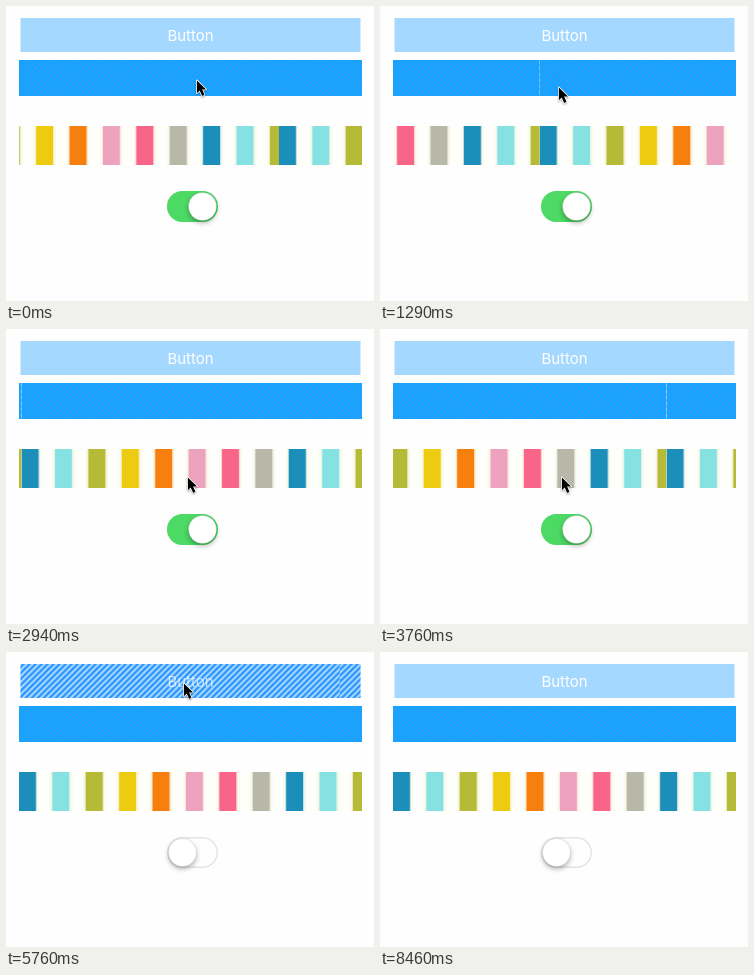
These frames come from a looping animation (368 by 295 pixels, 8.93 s). An HTML page with a canvas:

```html
<!DOCTYPE html>
<html>
<head>
<meta charset="utf-8">
<style>
html, body { margin: 0; width: 100%; height: 100%; overflow: hidden; background: #fefefe; }
canvas { display: block; }
</style>
</head>
<body>
<canvas id="stage" width="368" height="295"></canvas>
<script>
const ctx = document.getElementById('stage').getContext('2d');
const LOOP = 8930, STEP = 117.5, SPEED = 0.0876;
const STOP = 4700, PRESS = 5530, RELEASE = 7400, LEAVE = 8440;
const COLORS = ['#1b8fba', '#86e2e2', '#b5bb36', '#edcb10', '#f67f0e', '#eda3bd', '#f96588', '#b8b8a9'];

// Pointer tip: time, x, y
const PATH = [
  [0, 190, 73], [600, 186, 204], [900, 186, 204], [1290, 178, 80], [1890, 181, 147], [3760, 181, 147],
  [4700, 182, 190], [5170, 177, 30], [7280, 177, 30], [7760, 186, 176], [8110, 220, 196], [LOOP, 204, 222]
];

const clamp = v => Math.max(0, Math.min(1, v));
const ease = v => v * v * (3 - 2 * v);
const mod = (a, b) => ((a % b) + b) % b;

function pointerAt(t) {
  const i = PATH.findIndex(p => p[0] > t);
  const [t0, x0, y0] = PATH[i - 1], [t1, x1, y1] = PATH[i];
  const u = ease((t - t0) / (t1 - t0));
  return [x0 + (x1 - x0) * u, y0 + (y1 - y0) * u];
}

function rect(x, y, w, h, color) {
  ctx.fillStyle = color;
  ctx.fillRect(x, y, w, h);
}

function clipped(x, y, w, h, draw) {
  ctx.save();
  ctx.beginPath();
  ctx.rect(x, y, w, h);
  ctx.clip();
  draw();
  ctx.restore();
}

// Repeats a tile as wide as the box, scrolled by offset
function scrolling(x, y, w, h, offset, drawTile) {
  const start = x + mod(offset, w);
  clipped(x, y, w, h, () => {
    for (const left of [start - w, start]) clipped(left, y, w, h, () => drawTile(left));
  });
}

function hatch(x, y, w, h, lineWidth, color) {
  ctx.strokeStyle = color;
  ctx.lineWidth = lineWidth;
  ctx.beginPath();
  for (let d = 0; d < w + h; d += 6) {
    ctx.moveTo(x + d + 2, y - 2);
    ctx.lineTo(x + d - h - 2, y + h + 2);
  }
  ctx.stroke();
}

function drawButton(t) {
  const pressed = t >= PRESS && t < RELEASE;
  rect(14.5, 12, 340, 34, '#a5d8ff');
  if (pressed) {
    scrolling(14.5, 12, 340, 34, (PRESS - t) * SPEED, x => hatch(x, 12, 340, 34, 2.3, '#3298ff'));
  }
  ctx.fillStyle = pressed ? 'rgba(255,255,255,.7)' : '#fff';
  ctx.font = '15px Inter, "Liberation Sans", sans-serif';
  ctx.textAlign = 'center';
  ctx.fillText('Button', 184.5, 34.5);
}

function drawHatchedBar(offset) {
  scrolling(13, 54, 343, 36, offset, x => {
    rect(x, 54, 343, 36, '#12a5ff');
    hatch(x, 54, 343, 36, 1.1, '#3b98f4');
  });
}

function drawColorBars(offset) {
  scrolling(13, 120, 343, 39, offset, left => {
    rect(left, 120, 343, 39, '#fefefa');
    for (let i = 0; i < 11; i++) {
      const x = left + i * 33.4, color = COLORS[i % 8];
      rect(x - 3, 120, 23, 39, '#fafaee');
      rect(x - 1, 120, 19, 39, color + '40');
      rect(x, 120, 16.8, 39, color);
    }
  });
}

function pill(x, y, w, h, color) {
  ctx.beginPath();
  ctx.roundRect(x, y, w, h, h / 2);
  ctx.fillStyle = color;
  ctx.fill();
}

function drawSwitch(t) {
  const u = ease(clamp((t - STOP) / 350));
  pill(161, 185, 51, 31, '#e4e4e4');
  pill(162.5, 186.5, 48, 28, '#fefefe');
  ctx.globalAlpha = 1 - u;
  pill(161, 185, 51, 31, '#4cd964');
  ctx.globalAlpha = 1;
  ctx.save();
  ctx.shadowColor = 'rgba(0,0,0,.3)';
  ctx.shadowBlur = 5;
  ctx.shadowOffsetY = 2.5;
  pill(182.5 - 20 * u, 186.5, 28, 28, '#fff');
  ctx.restore();
  ctx.strokeStyle = 'rgba(0,0,0,.12)';
  ctx.lineWidth = 0.7;
  ctx.stroke();
}

function drawPointer(t) {
  if (t >= LEAVE) return;
  const [x, y] = pointerAt(t);
  const arrow = new Path2D('M1 1V15.2L4.1 12.1L6.9 18.2L9.4 17L6.8 11.1H11.2Z');
  ctx.save();
  ctx.translate(x, y + 0.5);
  ctx.scale(0.9, 0.9);
  ctx.shadowColor = 'rgba(0,0,0,.35)';
  ctx.shadowBlur = 2;
  ctx.shadowOffsetY = 1;
  ctx.lineJoin = 'round';
  ctx.lineWidth = 1.8;
  ctx.strokeStyle = '#fff';
  ctx.stroke(arrow);
  ctx.shadowColor = 'transparent';
  ctx.fillStyle = '#000';
  ctx.fill(arrow);
  ctx.restore();
}

function frame(now) {
  // The picture advances in even steps
  const t = Math.floor((now % LOOP) / STEP + 0.1) * STEP % LOOP;
  const offset = t < STOP ? 260 - t * SPEED : 0;
  rect(0, 0, 368, 295, '#fefefe');
  drawButton(t + 10);
  drawHatchedBar(offset);
  drawColorBars(offset);
  drawSwitch(t);
  drawPointer(t);
  requestAnimationFrame(frame);
}
requestAnimationFrame(frame);
</script>
</body>
</html>
```
